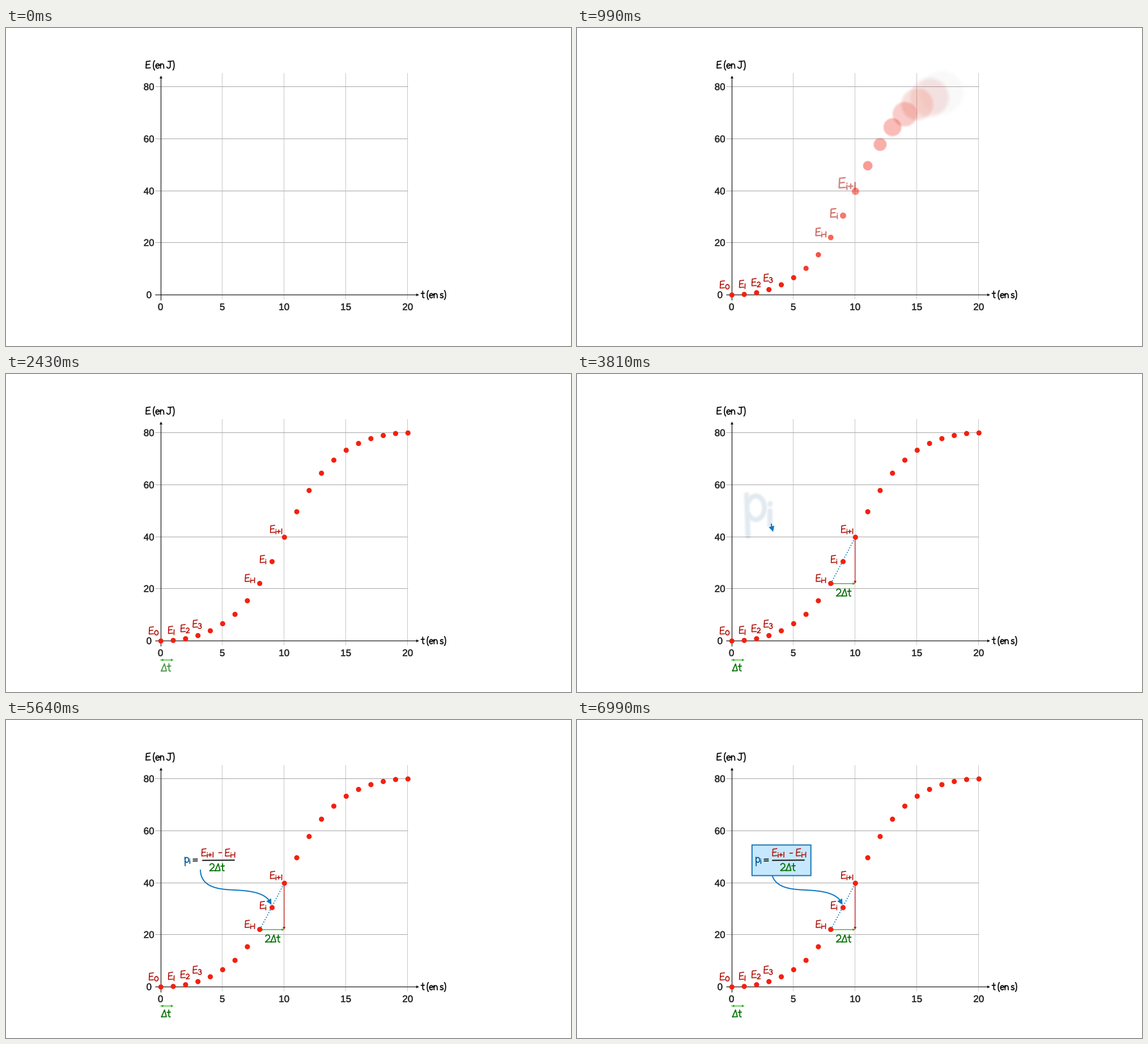
These frames come from a looping animation (997 by 561 pixels, 8.04 s). A matplotlib script:

```python
import numpy as np
import matplotlib.pyplot as plt
from matplotlib.animation import FuncAnimation
from matplotlib.patches import PathPatch, Polygon
from matplotlib.path import Path
from matplotlib.patheffects import withStroke

W, H, STEP, LOOP = 997, 561, 30, 8040
PX = 0.72  # points per pixel at 100 dpi
BLACK, RED, DARK_RED = "#111111", "#f3200f", "#b3170f"
GREEN, DARK_GREEN, BLUE, DARK_BLUE = "#22b014", "#0a740a", "#0f78bf", "#0c5c92"
CAP = 12.5

fig = plt.figure(figsize=(W / 100, H / 100), dpi=100, facecolor="white")
ax = fig.add_axes([0, 0, 1, 1])
ax.set(xlim=(0, W), ylim=(H, 0))
ax.axis("off")


# Handwritten glyphs: strokes in a box of cap height 1, y up from the baseline.
def line(*xy):
    return np.array(xy, float).reshape(-1, 2)


def arc(cx, cy, rx, ry, start, end):
    a = np.radians(np.linspace(start, end, 18))
    return np.column_stack([cx + rx * np.cos(a), cy + ry * np.sin(a)])


def join(*parts):
    return np.vstack(parts)


LETTERS = {
    "E": (0.68, [line(0.66, 1.04, 0.1, 0.97, 0.05, 0.02, 0.68, 0.06),
                 line(0.08, 0.51, 0.56, 0.56)]),
    "J": (0.75, [line(0.2, 1, 0.76, 1.02),
                 join(line(0.52, 1), arc(0.27, 0.25, 0.25, 0.24, 0, -165))]),
    "e": (0.56, [join(line(0.06, 0.32, 0.5, 0.38), arc(0.3, 0.32, 0.26, 0.32, 15, 315))]),
    "n": (0.56, [line(0.05, 0.64, 0.06, 0),
                 join(arc(0.29, 0.38, 0.23, 0.25, 180, 0), line(0.54, 0))]),
    "s": (0.5, [join(arc(0.27, 0.48, 0.2, 0.16, 40, 260), arc(0.24, 0.16, 0.23, 0.16, 80, -150))]),
    "t": (0.48, [join(line(0.24, 1), arc(0.4, 0.18, 0.16, 0.16, 180, 290)),
                 line(0, 0.66, 0.48, 0.69)]),
    "p": (0.6, [line(0.06, 0.74, 0.1, -0.48), arc(0.33, 0.36, 0.26, 0.35, 155, -150)]),
    "i": (0.15, [line(0.07, 0, 0.07, 0.6), line(0.07, 0.88, 0.08, 0.9)]),
    " ": (0.19, []),
}
SIGNS = {
    "0": (0.8, [arc(0.42, 0.5, 0.36, 0.46, 90, 450)]),
    "1": (0.2, [line(0.08, 0, 0.1, 1)]),
    "2": (0.66, [join(arc(0.32, 0.7, 0.29, 0.3, 160, -35), line(0.02, 0.02, 0.66, 0.05))]),
    "3": (0.64, [join(arc(0.3, 0.76, 0.27, 0.24, 150, -85), arc(0.3, 0.26, 0.33, 0.27, 85, -150))]),
    "+": (0.8, [line(0.05, 0.45, 0.7, 0.47), line(0.37, 0.13, 0.38, 0.78)]),
    "-": (0.4, [line(0, 0.48, 0.4, 0.5)]),
    "=": (0.6, [line(0, 0.22, 0.6, 0.23), line(0, 0.48, 0.6, 0.49)]),
    "Δ": (0.68, [line(0, 0.03, 0.42, 1, 0.68, 0.04, 0, 0.03)]),
    "(": (0.25, [arc(0.32, 0.42, 0.28, 0.72, 110, 250)]),
    ")": (0.25, [arc(-0.04, 0.42, 0.28, 0.72, 70, -70)]),
}
GLYPHS = {**LETTERS, **SIGNS}


def handwriting(text, x, baseline, cap=CAP):
    """Strokes in pixels; characters after "_" are subscripts."""
    strokes = []
    for ch in text:
        if ch == "_":
            cap, baseline = cap * 0.7, baseline + cap * 0.15
            continue
        width, parts = GLYPHS[ch]
        strokes += [p * [cap, -cap] + [x, baseline] for p in parts]
        x += (width + 0.1) * cap
    return strokes


class Ink:
    """Round-capped strokes that can be scaled, softened, faded and moved."""
    LAYERS = 6

    def __init__(self, strokes, color, width=1.7, zorder=4):
        self.points = np.vstack(strokes)
        self.codes = [c for s in strokes for c in [Path.MOVETO] + [Path.LINETO] * (len(s) - 1)]
        self.pivot = (self.points.min(0) + self.points.max(0)) / 2
        self.width = width
        self.layers = [
            ax.add_patch(PathPatch(Path(self.points, self.codes), fill=False, ec=color,
                                   lw=width * PX, capstyle="round", joinstyle="round",
                                   snap=False, zorder=zorder))
            for _ in range(self.LAYERS)]
        self.pose()

    def pose(self, alpha=1, scale=1, shift=(0, 0)):
        soft = 1.1 * (scale - 1)
        offsets = np.linspace(-soft, soft, self.LAYERS) if soft > 0.15 else [0]
        path = Path(self.pivot + (self.points - self.pivot) * scale + shift, self.codes)
        for k, layer in enumerate(self.layers):
            layer.set_visible(alpha > 0 and k < len(offsets))
            if layer.get_visible():
                layer.set_path(path)
                layer.set_linewidth((self.width * scale + offsets[k]) * PX)
                layer.set_alpha(1 - (1 - alpha) ** (1 / len(offsets)))

    def zoom_in(self, t, start, duration, extra=7.6):
        self.pose(*zoom(t, start, duration, extra))


class Arrow:
    """A path that grows from its first point behind an arrowhead."""

    def __init__(self, points, color, width, head, double=False, zorder=3):
        self.points, self.head, self.double = points, head, double
        self.shaft, = ax.plot([], [], color=color, lw=width * PX, snap=False, zorder=zorder)
        self.heads = [ax.add_patch(Polygon(np.zeros((3, 2)), fc=color, lw=0, zorder=zorder))
                      for _ in range(1 + double)]
        self.grow(1)

    def head_shape(self, path):
        tip = path[-1]
        near = path[np.hypot(*(path - tip).T) <= self.head]
        back = near[0] - tip
        back = back / max(np.hypot(*back), 1e-6)
        side = np.array([-back[1], back[0]])
        base = tip + back * self.head
        return [tip, base + side * self.head * 0.5, base - side * self.head * 0.5]

    def grow(self, p):
        path = self.points[:max(3, round(p * len(self.points)))]
        keep = np.hypot(*(path - path[-1]).T) > self.head * 0.7
        self.shaft.set_data(*path[keep].T)
        self.shaft.set_visible(p > 0)
        for head, route in zip(self.heads, (path, path[::-1])):
            head.set_xy(self.head_shape(route))
            head.set_visible(p > 0)


def straight(x0, y0, x1, y1):
    return np.linspace((x0, y0), (x1, y1), 200)


def bezier(*control):
    a, b, c, d = np.array(control, float)
    u = np.linspace(0, 1, 150)[:, None]
    return (1 - u) ** 3 * a + 3 * u * (1 - u) ** 2 * b + 3 * u * u * (1 - u) * c + u ** 3 * d


def progress(t, start, duration):
    return min(max((t - start) / duration, 0), 1)


def ease(u):
    return (1 - np.cos(np.pi * u)) / 2


def zoom(t, start, duration, extra):
    """Alpha and scale of a part that shrinks into place while fading in."""
    u = progress(t, start, duration)
    return u ** 1.3, 1 if u == 1 else 1 + extra * np.exp(-(u / 0.35) ** 2)


# Grid, axes and tick labels
TICK = dict(family="Liberation Sans", fontsize=17 * PX, color="#2b2b2b",
            path_effects=[withStroke(linewidth=0.45 * PX, foreground="#2b2b2b")])
for k in range(5):
    gx, gy = np.floor([273 + 108.85 * k, 470.8 - 91.85 * k]) + 0.5
    if k:
        ax.plot([gx, gx], [80, 478], color="#c6c6c6", lw=PX, snap=False, zorder=1)
        ax.plot([264, 709], [gy, gy], color="#a6a6a6", lw=PX, snap=False, zorder=1)
    ax.text(272.6 + 109.05 * k, 497.7, str(5 * k), ha="center", **TICK)
    ax.text(261.6 if k else 257, gy + 6, str(20 * k), ha="right", **TICK)
Arrow(straight(264, 470.8, 729, 470.8), BLACK, 1.2, 5, zorder=2)
Arrow(straight(273.5, 480, 273.5, 84), BLACK, 1.2, 5, zorder=2)
Ink(handwriting("E (en J)", 246.5, 71, 12.2), BLACK, 1.9)
Ink(handwriting("t (en s)", 732.5, 476, 11.8), BLACK, 1.9)

# Data points and their names
HEIGHTS = [0, 1, 4, 9.5, 18, 30.5, 47, 71, 101.5, 140, 183, 228, 265.5, 296,
           319, 336.5, 348.5, 357, 362.5, 366, 367]
dots = [Ink([straight(x, 471 - h, x + 0.02, 471 - h)[[0, -1]]], RED, 9.2, 5)
        for x, h in zip(273.3 + 21.8 * np.arange(21), HEIGHTS)]


def name(text, x, baseline):
    return Ink(handwriting(text, x, baseline), DARK_RED)


names = {0: name("E_0", 252, 459), 1: name("E_1", 286, 458), 2: name("E_2", 308, 455),
         3: name("E_3", 329.5, 447), 8: name("E_i-1", 421.5, 366.3),
         9: name("E_i", 448, 333), 10: name("E_i+1", 466, 280)}

# Time step and slope triangle
step_arrow = Arrow(straight(273, 504.5, 295.5, 504.5), GREEN, 1.3, 4.5, double=True)
step_label = Ink(handwriting("Δt", 274.5, 524), DARK_GREEN, 1.9)
CHORD = straight(448, 369.5, 491, 288)
chord, = ax.plot([], [], color=BLUE, lw=1.8 * PX, ls=(0, (1, 1.6)), zorder=3)
rise = Arrow(straight(490.7, 288, 490.7, 370), DARK_RED, 1.3, 5)
run = Arrow(straight(448, 369.8, 491, 369.8), GREEN, 1.3, 4.5, double=True)
run_label = Ink(handwriting("2Δt", 457.5, 392, 12.9), DARK_GREEN, 1.9)

# Formula and its pointer
pointer = Arrow(np.vstack([
    bezier((343, 265), (344, 290), (365, 298), (395, 299.5)),
    bezier((395, 299.5), (425, 301), (460, 302), (468.5, 326))]), BLUE, 2, 10)
BOX = line(308.8, 220.5, 412.7, 220.5, 412.7, 274.5, 308.8, 274.5)
box = ax.add_patch(Polygon(BOX, fc="#c6e8ff", ec="#1778b5", lw=2 * PX, snap=False, zorder=3.5))
power = Ink(handwriting("p_i", 315, 251.3), DARK_BLUE, 1.8)
equals = Ink(handwriting("=", 330.2, 251.5), BLACK, 1.8)
flights = [  # each part in its final place, with the offset it flies in from
    (name("E_i+1", 344.5, 240), (121.5, 40)),
    (name("E_i-1", 386.5, 240), (35, 126.3)),
    (Ink(handwriting("2Δt", 359, 266, 12.9), DARK_GREEN, 1.9), (98.5, 126)),
    (name("-", 375.5, 241), (0, -280)),
    (Ink([line(345, 247.6, 401, 247.2)], BLACK, 2), (700, 10)),
]


def draw(frame):
    t = frame * STEP
    for k, dot in enumerate(dots):
        for ink in (dot, names.get(k)):
            if ink:
                ink.zoom_in(t, 145 + 47 * k, 625)

    step_arrow.grow(ease(progress(t, 1750, 300)))
    step_label.zoom_in(t, 1930, 650)

    chord.set_data(*CHORD[:int(200 * ease(progress(t, 2570, 400)))].T)
    rise.grow(ease(progress(t, 2800, 400)))
    run.grow(ease(progress(t, 2950, 400)))
    run_label.zoom_in(t, 3070, 640)

    power.zoom_in(t, 3700, 640, extra=4.8)
    pointer.grow(ease(progress(t, 3600, 990)))
    equals.pose(progress(t, 4230, 360))

    left = 1 - ease(progress(t, 4770, 900))
    for ink, offset in flights:
        ink.pose(float(t >= 4770), shift=np.array(offset) * left)

    alpha, scale = zoom(t, 6350, 640, 2.8)
    middle = BOX.mean(0)
    box.set_xy(middle + (BOX - middle) * scale)
    box.set_alpha(alpha)
    box.set_visible(alpha > 0)
    return []


anim = FuncAnimation(fig, draw, frames=LOOP // STEP, interval=STEP, repeat=True, repeat_delay=0)
plt.show()
```
